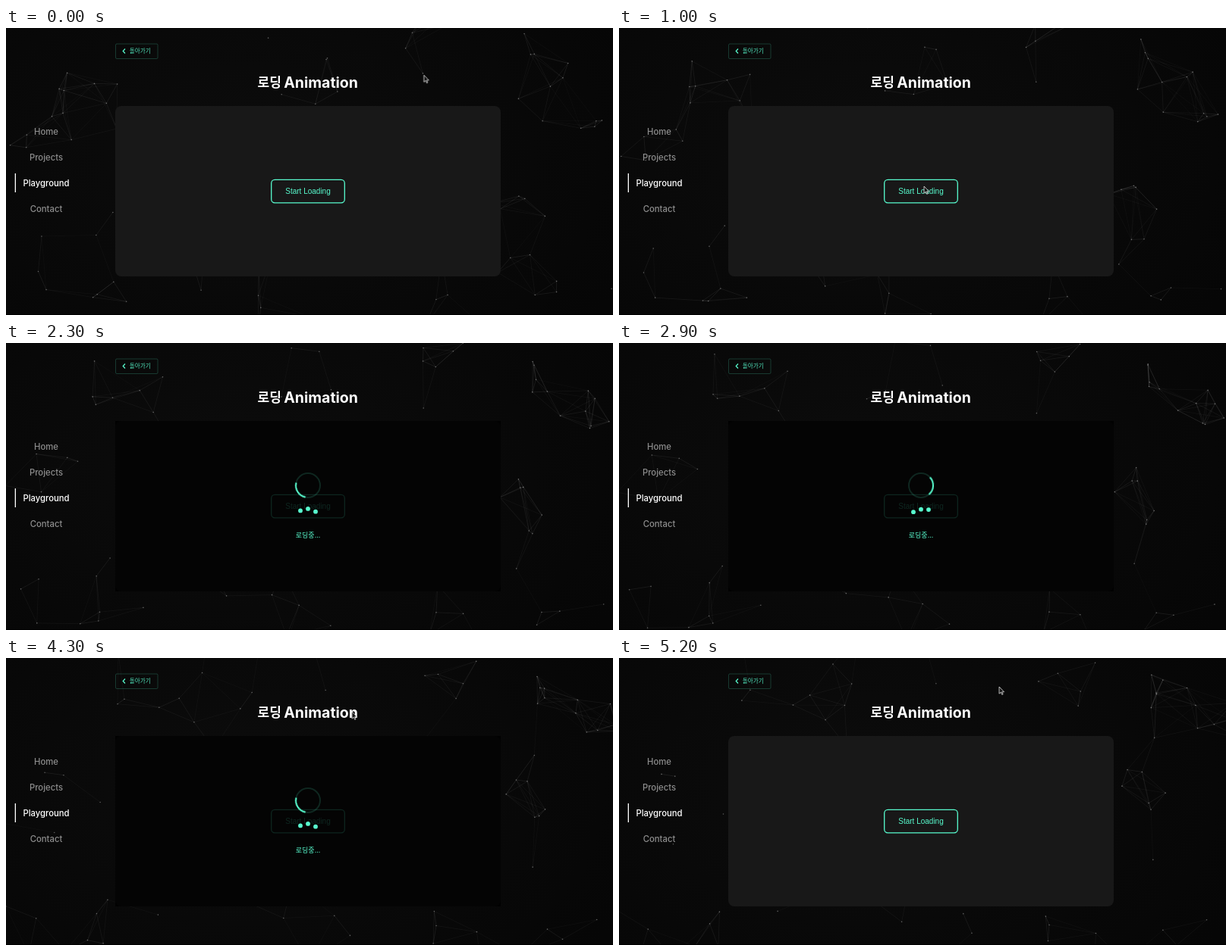
An HTML page with a canvas for the animation above (5300 ms loop, 800 by 379 pixels).

```html
<!DOCTYPE html>
<html lang="ko">
<head>
<meta charset="utf-8">
<title>로딩 Animation</title>
<style>
  :root { --accent: #58fbce; --loop: 5300ms linear infinite; }
  html, body { margin: 0; width: 100%; height: 100%; overflow: hidden; background: #080808; }
  #net, svg { position: absolute; left: 0; top: 0; width: 800px; height: 379px; }
  #net { background: radial-gradient(ellipse 70% 95% at 40% 45%, #0c0c0c, #060606); }
  text { font-family: Inter, sans-serif; }
  .ko { font-family: "Noto Sans CJK KR", "Noto Sans CJK", sans-serif; font-weight: 500; }
  .mid { text-anchor: middle; }
  .green { fill: var(--accent); }
  .line { fill: none; stroke: var(--accent); }
  .nav { font-size: 11.3px; font-weight: 500; fill: #8d8d8d; }
  .nav .on { fill: #fff; }
  .title { font-size: 19.5px; font-weight: 700; fill: #fff; }
  .title .ko { font-size: 17px; font-weight: 700; }
  .label { font: 10px "Liberation Sans", Arial, sans-serif; }

  .button { transform-origin: 398px 215.5px; animation: press var(--loop); }
  .shade { animation: shade var(--loop); }
  .loader { animation: loader var(--loop); }
  .late { animation: late var(--loop); }
  .arc { transform-origin: 398px 188px; animation: spin var(--loop); }
  .cursor { animation: move var(--loop), blink 5300ms step-end infinite; }

  @keyframes press {
    0%, 28.3% { transform: scale(1); }
    31%, 33% { transform: scale(.93); }
    36%, 100% { transform: scale(1); }
  }
  @keyframes shade {
    0%, 29.7% { opacity: 0; }
    35.4%, 86.4% { opacity: .85; }
    92.1%, 100% { opacity: 0; }
  }
  @keyframes loader {
    0%, 29.9% { opacity: 0; }
    35.6%, 85.6% { opacity: 1; }
    91.2%, 100% { opacity: 0; }
  }
  @keyframes late {
    0%, 31% { opacity: 0; }
    39.6%, 100% { opacity: 1; }
  }
  @keyframes spin {
    from { transform: rotate(129deg); }
    to { transform: rotate(2037deg); }
  }
  @keyframes move {
    0% { transform: translate(551px, 62px); }
    13.2% { transform: translate(415px, 200px); }
    18.9% { transform: translate(402px, 209px); }
    28.3%, 42% { transform: translate(401px, 216px); }
    65% { transform: translate(432px, 110px); }
    71.7% { transform: translate(437px, 72px); }
    88.7% { transform: translate(471px, 70px); }
    98.1% { transform: translate(501px, 38px); }
    100% { transform: translate(506px, 36px); }
  }
  @keyframes blink {
    0% { opacity: 1; }
    42% { opacity: 0; }
    66% { opacity: 1; }
  }
</style>
</head>
<body>
<canvas id="net" width="800" height="379"></canvas>
<svg viewBox="0 0 800 379">
  <rect y="378" width="800" height="1"/>

  <rect class="line" x="144.5" y="21" width="55.5" height="19.5" rx="1.5" stroke-opacity=".2"/>
  <path class="line" d="M157 27.5l-2.8 3 2.8 3" stroke-width="1.2"/>
  <text class="ko green" x="162.8" y="33.3" font-size="7.6" opacity=".9">돌아가기</text>

  <g class="title">
    <text class="ko" x="331.5" y="78.3">로딩</text>
    <text x="366.3" y="78.5">Animation</text>
  </g>

  <g class="nav mid">
    <text x="53" y="140.7">Home</text>
    <text x="53" y="174.7">Projects</text>
    <text class="on" x="53" y="208.7">Playground</text>
    <text x="53" y="242.7">Contact</text>
  </g>
  <rect x="11.7" y="192" width="1.3" height="25" fill="#fff"/>

  <rect x="144" y="103" width="508" height="225" rx="8" fill="#181818"/>
  <g class="button">
    <rect class="line" x="349.7" y="200.4" width="96.6" height="30.4" rx="4.5" stroke-width="1.3"/>
    <text class="label mid green" x="398" y="219">Start Loading</text>
  </g>

  <rect class="shade" x="144" y="103" width="508" height="225"/>
  <g class="loader">
    <circle class="line" cx="398" cy="188" r="16" stroke-width="2" stroke-opacity=".14"/>
    <path class="line arc" d="M386.7 176.7A16 16 0 0 1 409.3 176.7" stroke-width="2.1"/>
    <g class="late green">
      <circle class="dot" cx="388" cy="221" r="2.9"/>
      <circle class="dot" cx="398" cy="221" r="2.9"/>
      <circle class="dot" cx="408" cy="221" r="2.9"/>
      <text class="ko mid" x="398" y="256.8" font-size="9">로딩중...</text>
    </g>
  </g>

  <path class="cursor" d="M0 0V9.2L2.2 7.2 3.7 10.4 5 9.8 3.6 6.8H6.4Z" fill="#111" stroke="#eee" stroke-width=".8"/>
</svg>
<script>
  const LOOP = 5300, REACH = 72;
  const ctx = document.getElementById('net').getContext('2d');
  const dots = document.querySelectorAll('.dot');

  let seed = 41;
  const rand = () => (seed = seed * 16807 % 2147483647) / 2147483647;
  const spread = r => (rand() * 2 - 1) * r;

  // Drifting groups: x, y, velocity in px/s, count, spread
  const groups = [
    [115, 90, 22, -9, 8, 45],
    [90, 300, -4, 9, 8, 58],
    [540, 30, 6, 7, 6, 48],
    [730, 130, 3, -9, 7, 58],
    [685, 275, 5, -18, 8, 55],
    [365, 350, 15, 0, 6, 48],
    [710, 30, 8, 3, 5, 55],
    [50, 115, 6, 9, 5, 45],
    [600, 350, 0, -1, 5, 52],
    [385, 65, -12, -6, 6, 55],
    [745, 300, -3, 4, 4, 55],
    [210, 350, 8, -2, 4, 52]
  ];
  const points = groups.flatMap(([x, y, vx, vy, count, size]) =>
    Array.from({ length: count }, () => ({
      x: x + spread(size), y: y + spread(size),
      vx: vx + spread(9), vy: vy + spread(9)
    })));

  function drawNet(s) {
    ctx.clearRect(0, 0, 800, 379);
    ctx.lineWidth = 0.6;
    const now = points.map(p => [p.x + p.vx * s, p.y + p.vy * s]);
    now.forEach(([x, y], i) => {
      for (const [x2, y2] of now.slice(i + 1)) {
        const d = Math.hypot(x - x2, y - y2);
        if (d > REACH) continue;
        ctx.strokeStyle = `rgba(255,255,255,${0.05 + 0.11 * (1 - d / REACH)})`;
        ctx.beginPath();
        ctx.moveTo(x, y);
        ctx.lineTo(x2, y2);
        ctx.stroke();
      }
      ctx.fillStyle = 'rgba(255,255,255,.34)';
      ctx.beginPath();
      ctx.arc(x, y, 0.8, 0, Math.PI * 2);
      ctx.fill();
    });
  }

  function frame() {
    const t = performance.now() % LOOP;
    drawNet(t / 1000);
    dots.forEach((dot, i) => {
      const turn = (t - 2910) / 500 - i / 3;
      dot.setAttribute('cy', 221 + 2.2 * Math.cos(turn * Math.PI * 2));
    });
    requestAnimationFrame(frame);
  }
  frame();
</script>
</body>
</html>
```
